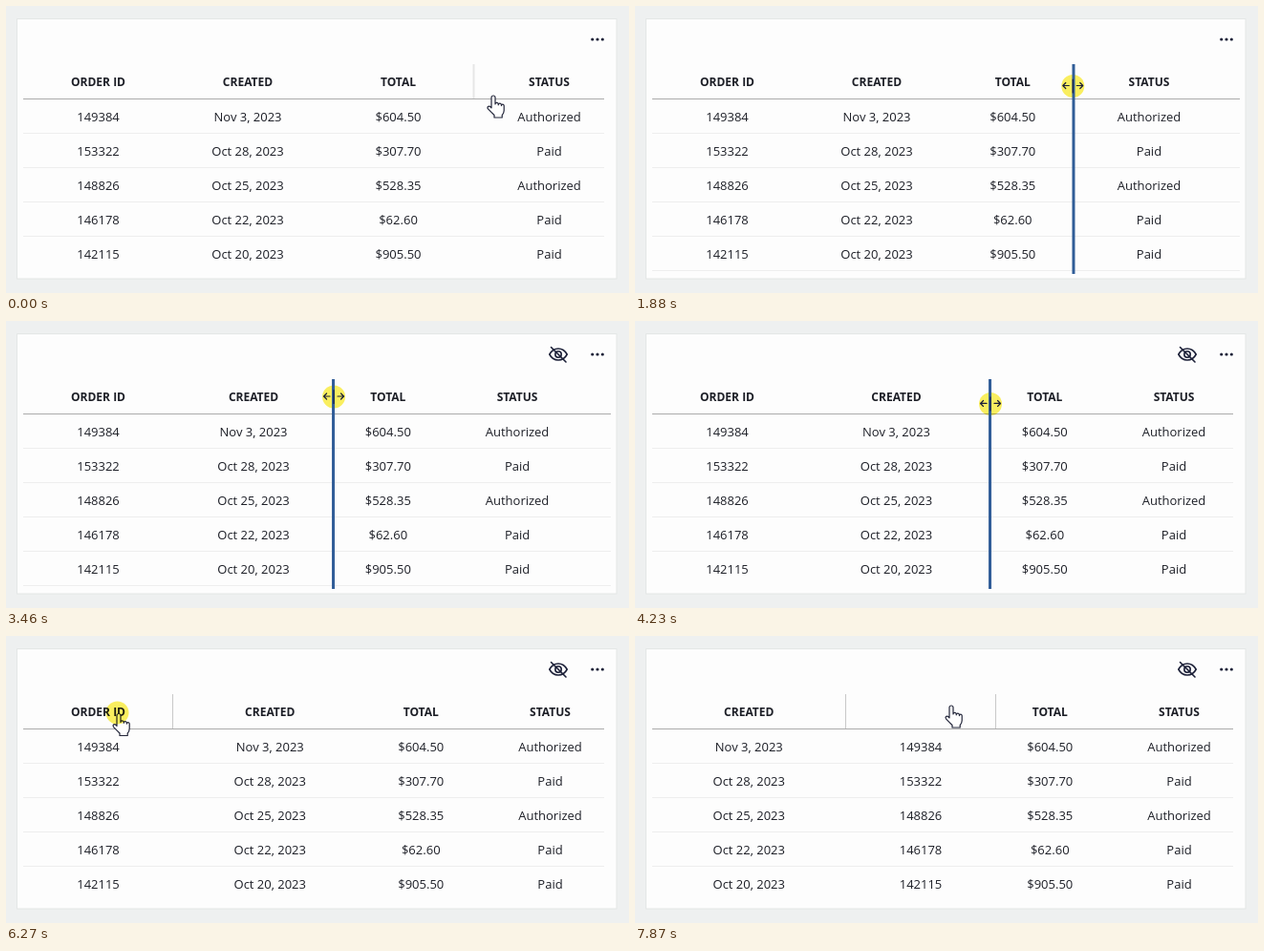
Animation, 652 px wide and 301 px high, one loop 8 s. Source, as an HTML page:

```html
<!DOCTYPE html>
<html lang="en">
<head>
<meta charset="utf-8">
<title>Resizing and reordering table columns</title>
<style>
  html, body { margin: 0; width: 100%; height: 100%; overflow: hidden; background: #eef0f0; }
  svg { display: block; width: 652px; height: 301px; }
  text { font: 13px "Open Sans", "Noto Sans", sans-serif; fill: #1d1f27; text-anchor: middle; }
  text.head { font-size: 12px; font-weight: 700; }
  .rule { stroke: #eeeeee; }
  .head-rule { stroke: #ababab; }
  .border { stroke: #c9c9c9; }
  .border.soft { stroke: #e6e6e6; stroke-width: 2; }
  .ink { fill: none; stroke: #1c2038; stroke-width: 1.6; stroke-linecap: round; stroke-linejoin: round; }
  .pointer { fill: #fff; stroke: #23263a; stroke-width: 1.2; stroke-linejoin: round; }
  #press { fill: #fbf060; mix-blend-mode: multiply; }
  #ghostCard { filter: drop-shadow(0 2px 5px rgba(0, 0, 0, .22)); }
</style>
</head>
<body>
<svg viewBox="0 0 652 301">
  <rect x="11.5" y="13.5" width="627.5" height="272.5" fill="#fdfdfd" stroke="#e4e7e6"/>
  <g fill="#1c2038">
    <circle cx="613.7" cy="35" r="1.6"/><circle cx="619" cy="35" r="1.6"/><circle cx="624.3" cy="35" r="1.6"/>
  </g>
  <g id="eye" class="ink">
    <path d="M568.8 35Q572 29 578 29T587.2 35Q584 41 578 41T568.8 35Z"/>
    <circle cx="578" cy="35" r="3.2"/>
    <path d="M570.5 27.5L586 43"/>
  </g>
  <g id="rules"></g>
  <g id="columns"></g>
  <rect id="slot" x="17" y="61" width="158" height="213" fill="#cecfd1"/>
  <line id="headRule" class="head-rule" x1="18" y1="97.5" y2="97.5"/>
  <line id="leftBorder" class="border" y1="61" y2="97"/>
  <line id="rightBorder" class="border" y1="61" y2="97"/>
  <g id="ghost">
    <rect id="ghostCard" width="156.5" height="219" fill="#fdfdfd"/>
    <line class="head-rule" x2="156.5" y1="38.5" y2="38.5"/>
  </g>
  <path id="hand" class="pointer" d="M-.5 13.9V3a2 2 0 0 1 4 0V10a1.6 1.6 0 0 1 3.2 0v.8a1.6 1.6 0 0 1 3.2 0v.8a1.4 1.4 0 0 1 2.8 0V16.5q0 3-2 5v2.5H2.5V21.500Q.5 19.500-3.800 15.100c-1.800-2 .6-4 2-2.600Z"/>
  <path id="grab" class="pointer" d="M-4.500-3.500a1.700 1.700 0 0 1 3-.8a1.600 1.600 0 0 1 3 0a1.600 1.600 0 0 1 2.800 .8a1.400 1.400 0 0 1 2.200 1.300V2q0 2-1.500 4V7.500H-3.500V6Q-5 4-6.500 1.500q-.5-2.500 2-2.300Z"/>
  <circle id="press" r="12"/>
  <rect id="guide" y="61" width="3" height="220" fill="#315d98"/>
  <g id="resize" class="ink" style="stroke-width:1.2">
    <path d="M-4-.5H-10M-7.500-3.500L-10.500-.5L-7.500 2.500M4-.5H10M7.500-3.500L10.500-.5L7.500 2.500M0-7V7"/>
  </g>
</svg>
<script>
const LOOP = 8000, LEFT = 18, ROW = 36;
const GRAB_START = 6340, DROP = 7600;
const $ = id => document.getElementById(id);

const table = [
  ['ORDER ID', '149384', '153322', '148826', '146178', '142115'],
  ['CREATED', 'Nov 3, 2023', 'Oct 28, 2023', 'Oct 25, 2023', 'Oct 22, 2023', 'Oct 20, 2023'],
  ['TOTAL', '$604.50', '$307.70', '$528.35', '$62.60', '$905.50'],
  ['STATUS', 'Authorized', 'Paid', 'Authorized', 'Paid', 'Paid']
];

// Each key: time, values..., and an optional trailing 'ease' for the move into it.
const createdWidth = [[3320, 156], [3460, 168], [4090, 193], [4230, 197], [4480, 202.5]];
const totalWidth = [[910, 159], [1300, 153], [1670, 145], [1880, 128.5], [2300, 113.5]];
const cursor = [
  [0, 508.5, 93], [700, 490.3, 70, 'ease'], [910, 490.3, 68], [1300, 484, 76], [1670, 476, 82],
  [1880, 458.3, 84], [2300, 444, 84], [2520, 444, 84], [2800, 390, 87], [3050, 337, 80],
  [3320, 337, 80], [3460, 343, 79.5], [4090, 368, 86], [4230, 372, 87], [4480, 378, 80],
  [5060, 378, 80], [5670, 116.5, 80.5, 'ease'], [6270, 116.5, 80.5], [7310, 297.5, 81.5, 'ease'],
  [DROP, 325, 74], [7870, 329.5, 72]
];

function track(keys, t, slot = 1) {
  if (t <= keys[0][0]) return keys[0][slot];
  for (let i = 1; i < keys.length; i++) {
    const a = keys[i - 1], b = keys[i];
    if (t < b[0]) {
      let p = (t - a[0]) / (b[0] - a[0]);
      if (b.includes('ease')) p = p * p * (3 - 2 * p);
      return a[slot] + (b[slot] - a[slot]) * p;
    }
  }
  return keys[keys.length - 1][slot];
}

function add(parent, tag, attrs, label = '') {
  const el = document.createElementNS('http://www.w3.org/2000/svg', tag);
  for (const name in attrs) el.setAttribute(name, attrs[name]);
  el.textContent = label;
  return parent.appendChild(el);
}
const show = (id, on) => $(id).style.display = on ? '' : 'none';
const move = (el, x, y = 0) => el.setAttribute('transform', `translate(${x} ${y})`);
const within = (t, a, b) => t >= a && t < b;

const columns = table.map(cells => {
  const g = add($('columns'), 'g', {});
  cells.forEach((label, i) => add(g, 'text',
    i ? { y: 85 + ROW * i } : { y: 84, class: 'head' }, label));
  return g;
});
const rules = [1, 2, 3, 4, 5].map(i => {
  const y = 97.5 + ROW * i;
  return add($('rules'), 'line', { class: 'rule', x1: LEFT, y1: y, y2: y });
});
table[0].forEach((label, i) => {
  if (!i) {
    add($('ghost'), 'text', { x: 5, y: 24, class: 'head', style: 'text-anchor:start' }, label);
    return;
  }
  add($('ghost'), 'text', { x: 78, y: 25 + ROW * i }, label);
  add($('ghost'), 'line', { class: 'rule', x2: 156.5, y1: 38.5 + ROW * i, y2: 38.5 + ROW * i });
});

function draw(t) {
  const x = track(cursor, t, 1), y = track(cursor, t, 2);
  const widths = [157, track(createdWidth, t), track(totalWidth, t), 157];
  const dropped = t >= DROP;
  const order = dropped ? [1, 0, 2, 3] : [0, 1, 2, 3];

  const edges = [LEFT];
  order.forEach((col, i) => {
    edges.push(edges[i] + widths[col]);
    move(columns[col], (edges[i] + edges[i + 1]) / 2);
  });
  columns[0].firstChild.style.display = dropped ? 'none' : '';

  // Rows fill the card while the columns fit, and are cut shorter when they overflow.
  const fits = edges[4] < 633, rowEnd = fits ? 633 : 626;
  [...rules, $('headRule')].forEach(r => r.setAttribute('x2', rowEnd));
  rules[4].style.display = fits ? '' : 'none';

  const sizingTotal = within(t, 910, 2330), sizingCreated = within(t, 3320, 4700);
  const sizing = sizingTotal || sizingCreated;
  const grabbing = within(t, GRAB_START, DROP);

  const hovered = Math.max(0, edges.findIndex((e, i) => i && x < e) - 1);
  [['leftBorder', hovered], ['rightBorder', hovered + 1]].forEach(([id, i]) => {
    show(id, !sizing && i > 0 && i < 4);
    const at = Math.round(edges[i]) - .5;
    $(id).setAttribute('x1', at);
    $(id).setAttribute('x2', at);
    $(id).setAttribute('class', t < 910 ? 'border soft' : 'border');
  });

  show('guide', sizing);
  $('guide').setAttribute('x', edges[sizingTotal ? 3 : 2] - 2);
  show('eye', t >= 2450);
  show('slot', grabbing);
  show('ghost', grabbing);
  move($('ghost'), x - 80.5, y + 16.5);

  const nearEdge = !dropped && edges.slice(1, 4).some(e => Math.abs(x - e) < 7);
  const shape = grabbing ? 'grab' : sizing || nearEdge ? 'resize' : 'hand';
  ['hand', 'grab', 'resize'].forEach(id => {
    show(id, id === shape);
    move($(id), x, y);
  });
  show('press', sizing || within(t, 5870, DROP));
  move($('press'), x, y);
}

function tick() {
  draw(performance.now() % LOOP);
  requestAnimationFrame(tick);
}
tick();
</script>
</body>
</html>
```
